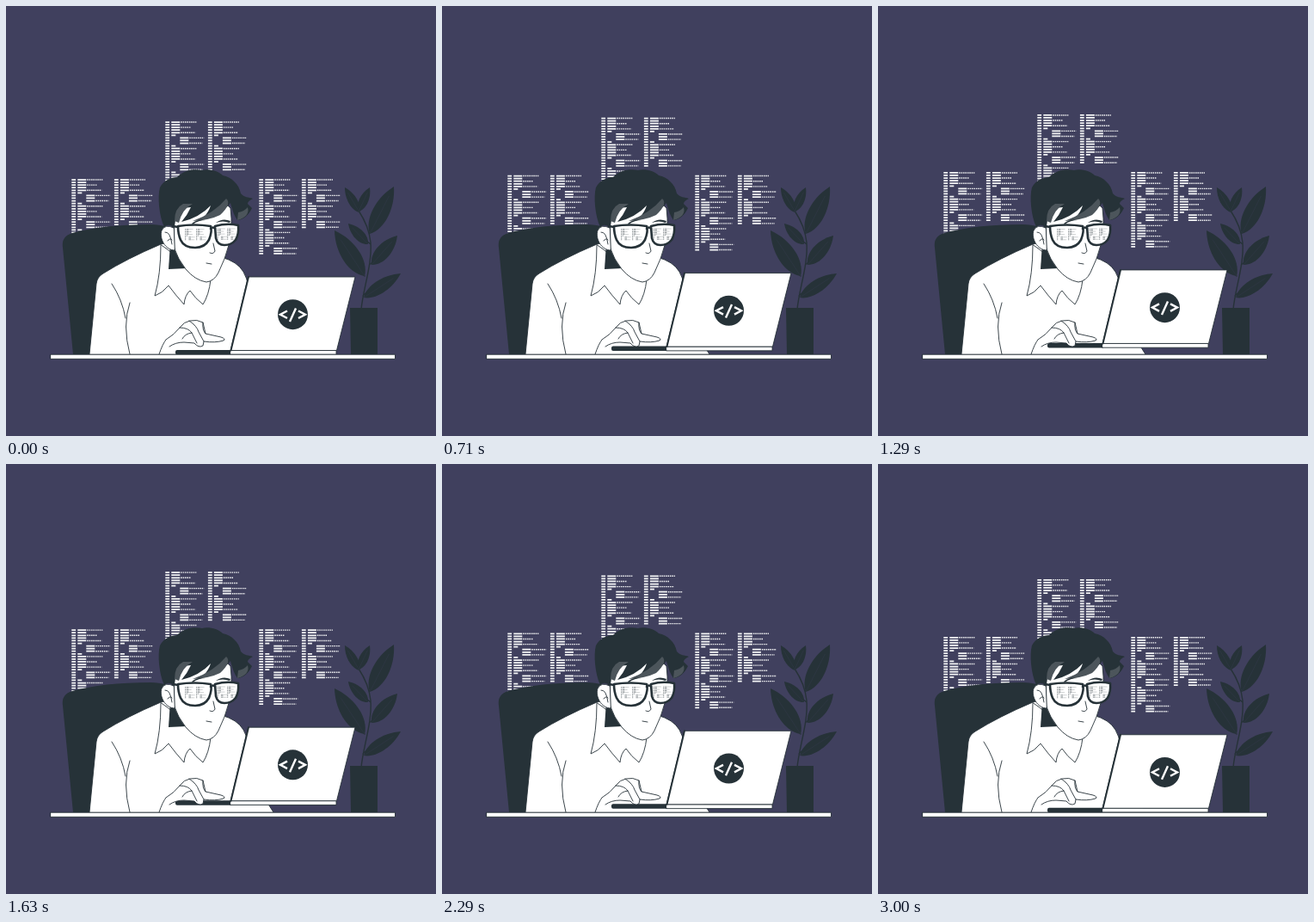
Animation of 500x500 px, one loop 3040 ms. Source, as an HTML page:

```html
<!DOCTYPE html>
<html lang="en">
<head>
<meta charset="utf-8">
<title>Coder at work</title>
<style>
html, body { margin: 0; width: 100%; height: 100%; overflow: hidden; background: #40405e; }
svg { display: block; width: 100vw; height: 100vh; }
.dark { fill: #263238; }
.white { fill: #fff; }
.grey { fill: #4c555b; }
.line { fill: none; }
.ink { stroke: #263238; stroke-width: .9; stroke-linecap: round; stroke-linejoin: round; }
.rib { fill: none; stroke: #40405e; stroke-width: .4; opacity: .6; }
.bars { fill: none; stroke-width: 1.75; }
.dots { fill: none; stroke-width: 1.4; stroke-dasharray: 1.5 .9; }
</style>
</head>
<body>
<svg viewBox="0 0 500 500">
  <g id="code" stroke="#f4f5f6"></g>

  <g id="plant">
    <path class="line ink" style="stroke-width:1.4" d="M413 353C415 330 426 300 424 275Q422 256 410 238M415 337L428 325M417 314L407 303M424 300L433 290M424 277L413 268M423 264L430 251"/>
    <path class="dark" d="M400 351H432V405H401Z"/>
  </g>

  <path class="dark" d="M78 405L66 281Q64 268 77 264Q112 254 168 254Q190 254 195 264L185 290L112 405Z"/>

  <!-- shirt -->
  <path class="white ink" d="M97 405L105 323Q106 315 113 311Q140 294 180 277L192 274L250 292Q269 297 276 309Q280 316 282 326L270 370L304 394L311 405Z"/>
  <path class="line ink" d="M123 323Q135 341 139 363M144 345Q135 371 144 405"/>
  <path class="white ink" d="M180 278Q180 312 173 337Q182 334 189 325Q197 336 207 347Q208 336 214 331Q220 340 229 347Q236 336 238 318L222 314L189 284Z"/>
  <path class="dark" d="M191 276L189 306L210 305L203 281Z"/>

  <!-- head -->
  <path class="white ink" d="M196 240L195 280Q200 295 209 306Q220 319 233 321Q242 320 247 310Q255 294 259 278Q264 260 261 235L245 220H210Z"/>
  <path class="white ink" d="M195 258Q185 253 181 261C178 270 185 284 196 284Z"/>
  <path class="line ink" d="M185 263Q191 262 193 277M188 273Q191 269 193 272M241 276L243 285Q241 289 237 287M233 299L239 300"/>
  <path class="dark" d="M184 257C178 244 176 222 179 211C183 203 192 199 199 199C207 190 220 189 228 191C236 189 247 192 252 197C262 199 271 207 273 218C277 223 282 222 287 224Q281 227 281 230L286 235C283 242 276 249 269 249Q264 242 261 229Q251 242 229 247Q236 239 238 232Q225 246 204 251Q211 243 215 234Q205 234 200 242Q196 249 196 258Q189 252 184 257Z"/>
  <path class="grey" d="M196 250Q196 235 206 230L217 230Q205 236 201 252ZM217 250Q242 241 256 224Q263 230 249 243Q237 249 217 250ZM269 249Q284 245 281 234Q277 239 270 240Z"/>
  <path class="dark" d="M216 253Q223 247 232 249Q224 249 217 254ZM244 252Q252 246 261 250L260 252Q252 249 244 252Z"/>

  <!-- glasses -->
  <g class="white ink" style="stroke-width:2.6">
    <path d="M200 256Q219 253 238 256Q240 262 236 272Q231 281 220 281Q207 281 203 272Q200 265 200 256Z"/>
    <path d="M243 256Q257 252 270 255Q271 265 267 272Q262 278 254 278Q246 278 244 270Z"/>
    <path class="line" d="M194 256L200 257M238 259Q241 256 243 259"/>
  </g>
  <g id="lens" stroke="#263238"></g>

  <g id="laptop">
    <path class="dark" d="M199 400H262V405.5H199Q197 405.5 197 403.5V402Q197 400 199 400Z"/>
    <path class="white ink" d="M261 400.5H384V405.3H261Z"/>
    <path class="white ink" d="M282 315H406L384.5 400.5H261.5Z"/>
    <path class="line ink" style="stroke-width:2" d="M282 315L261.5 400.5"/>
    <circle class="dark" cx="333.5" cy="358.7" r="17.5"/>
    <path class="line" stroke="#fff" stroke-width="2.4" d="M327 354.5L319 358.7L327 363M340 354.5L348 358.7L340 363M337 351.5L330 367"/>
  </g>

  <!-- hand -->
  <path class="line ink" d="M178 405Q182 393 186 388"/>
  <path class="white ink" d="M186 388Q196 382 202 374Q207 367 214 366Q222 364 229 368L232 381L250 385Q256 387 253 389Q243 392 230 390L229 395Q224 398 219 392L207 391Q197 391 190 396"/>
  <path class="line ink" d="M202 374Q212 374 216 380L222 392M213 366Q222 372 224 379L230 390M229 368Q228 377 232 381M216 380Q208 381 205 387"/>

  <path class="white ink" d="M52 405.2H452.5V410.4H52Z"/>
</svg>
<script>
const $ = id => document.getElementById(id);
const add = (parent, html) => parent.insertAdjacentHTML('beforeend', html);

// bar start, bar end, dots start, dots end
const rows = [
  [7, 17, 18, 36], [7, 17], [7, 17, 18, 30], [7, 17], [7, 17, 18, 35],
  [7, 12], [17, 27, 28, 45], [17, 27], [17, 27, 28, 43], [7, 12]
];

function column(parent, x, y, groups) {
  let bars = '', dots = '';
  for (let i = 0; i < groups * 10 - 1; i++) {
    const [a, b, c, d] = rows[i % 10], h = y + 1 + i * 3.07;
    bars += `M${x} ${h}h4.8M${x + a} ${h}H${x + b}`;
    if (d) dots += `M${x + c} ${h}H${x + d}`;
  }
  add(parent, `<path class="bars" d="${bars}"/><path class="dots" d="${dots}"/>`);
}

for (const [x, y] of [[185.3, 134], [76.3, 201], [294.3, 201]]) {
  column($('code'), x, y, 3);
  column($('code'), x + 49.6, y, 2);
}

for (const [x, y] of [[208, 259], [221, 259], [245.5, 258.5], [257, 258.5]]) {
  const g = document.createElementNS('http://www.w3.org/2000/svg', 'g');
  g.setAttribute('transform', `translate(${x} ${y}) scale(.26 .5)`);
  g.setAttribute('opacity', .7);
  $('lens').append(g);
  column(g, 0, 0, 1);
}

// leaf from base (x, y) to tip (u, v), widest near the base
function leaf(x, y, u, v, w) {
  const dx = u - x, dy = v - y, n = Math.hypot(dx, dy);
  const at = (k, s) => `${x + dx * k - dy / n * s} ${y + dy * k + dx / n * s}`;
  add($('plant'), `<path class="dark" d="M${x} ${y}C${at(.2, w)} ${at(.65, w)} ${u} ${v}C${at(.65, -w)} ${at(.2, -w)} ${x} ${y}"/>
    <path class="rib" d="M${x} ${y}L${at(.8, 0)}"/>`);
}
leaf(411, 240, 394, 211, 7);
leaf(410, 239, 423, 211, 7);
leaf(423, 265, 451, 210, 13);
leaf(421, 277, 398, 253, 8);
leaf(425, 301, 455, 267, 11);
leaf(417, 314, 382, 261, 14);
leaf(416, 339, 459, 311, 10);

const loop = 3040, rise = 9.5;
function draw(now) {
  // 24 steps a second
  const t = Math.floor((now % loop + 5) * .024) / .024;
  const y = -rise * (1 - Math.abs(1 - 2 * t / loop));
  for (const id of ['code', 'laptop']) $(id).setAttribute('transform', `translate(0 ${y})`);
  requestAnimationFrame(draw);
}
draw(0);
</script>
</body>
</html>
```
